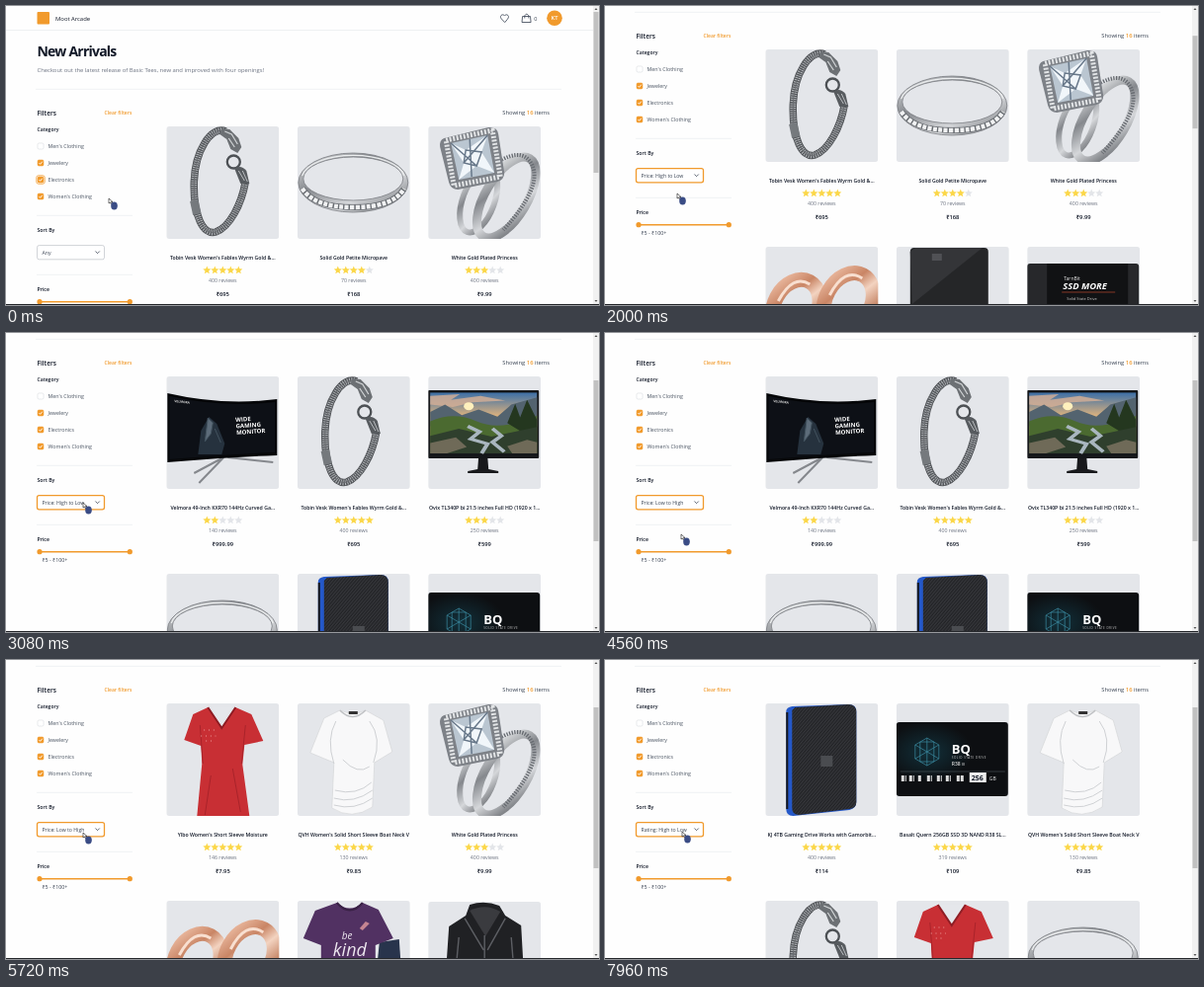
An HTML page that plays this animation: 600x303 px, repeating every 8000 ms.

```html
<!DOCTYPE html>
<html lang="en">
<head>
<meta charset="utf-8">
<title>New Arrivals</title>
<style>
  html, body { margin: 0; width: 100%; height: 100%; overflow: hidden; background: #fefefe; }
  svg { display: block; width: 100vw; height: 100vh; }
  text { font-family: "Open Sans", "Noto Sans", sans-serif; fill: #111827; white-space: pre; }
  .line { stroke: #e5e7eb; stroke-width: .6; }
  .icon { fill: none; stroke: #374151; stroke-width: .8; stroke-linejoin: round; stroke-linecap: round; }
  .none { fill: none; }
</style>
</head>
<body>
<svg id="stage" viewBox="0 0 600 303" preserveAspectRatio="none">
  <defs>
    <clipPath id="tile"><rect width="114" height="114" rx="3"/></clipPath>
    <linearGradient id="silver" x2="1" y2="1">
      <stop stop-color="#eceeef"/><stop offset=".35" stop-color="#85888d"/>
      <stop offset=".65" stop-color="#d5d7da"/><stop offset="1" stop-color="#606368"/>
    </linearGradient>
    <linearGradient id="rose" x2="1" y2=".6">
      <stop stop-color="#e9b79d"/><stop offset=".35" stop-color="#c98565"/>
      <stop offset=".6" stop-color="#f3d3c0"/><stop offset="1" stop-color="#bd7857"/>
    </linearGradient>
    <linearGradient id="sky" x2="0" y2="1">
      <stop stop-color="#3c6fa6"/><stop offset=".4" stop-color="#e2b47c"/><stop offset="1" stop-color="#5d6b45"/>
    </linearGradient>
    <radialGradient id="teal" cx=".28" cy=".4" r=".4">
      <stop stop-color="#12303a"/><stop offset="1" stop-color="#0d0f12"/>
    </radialGradient>
    <pattern id="mesh" width="2.4" height="2.4" patternUnits="userSpaceOnUse" patternTransform="rotate(40)">
      <rect width="2.4" height="2.4" fill="#222326"/><rect width="1.1" height="2.4" fill="#37383c"/>
    </pattern>

    <path id="chain" d="M60 5C45-1 29 25 28 56C27 90 37 111 50 107C64 102 76 79 80 56" fill="none"/>
    <g id="bracelet">
      <use href="#chain" stroke="#505357" stroke-width="7.500"/>
      <use href="#chain" stroke="#b1b4b8" stroke-width="5.800" stroke-dasharray="1 1.2"/>
      <use href="#chain" stroke="#6a6d71" stroke-width="1"/>
      <path d="M28 75l3 14" stroke="#75797d" stroke-width="8.500"/>
      <path d="M56 2l8 1 9 9 3 9-4 6-7-4-4-10-7-5z" fill="#6c7074"/>
      <path d="M59 5l7 3 6 10M63 12l6 9" stroke="#d0d3d5" class="none" stroke-width="1.200"/>
      <circle cx="68" cy="36" r="6.500" class="none" stroke="#4d5155" stroke-width="2.300"/>
      <path d="M69 43q6-5 12 2l3 13h-9z" fill="#575b5f"/>
      <path d="M73 45l6 10M77 45l5 11" stroke="#babdc0"/>
    </g>
    <g id="ring">
      <path d="M1 57A55.500 30 0 0 1 112 57A55.500 30 0 0 1 1 57zM6 53A50.500 22 0 0 0 107 53A50.500 22 0 0 0 6 53z"
            fill="url(#silver)" fill-rule="evenodd" stroke="#7a7d82" stroke-width=".8"/>
      <path d="M5 50A52 24 0 0 1 108 50" class="none" stroke="#eceeef" stroke-width="1.200"/>
      <path d="M5 63Q17 82 57 82T108 63" class="none" stroke="#696d72" stroke-width="6"/>
      <path d="M5 63Q17 82 57 82T108 63" class="none" stroke="#f1f2f3" stroke-width="4.400" stroke-dasharray="4 1.4"/>
    </g>
    <g id="princess">
      <g class="none" stroke="url(#silver)">
        <ellipse cx="51" cy="75" rx="16" ry="34" transform="rotate(20 51 75)" stroke-width="6"/>
        <ellipse cx="79" cy="72" rx="21" ry="46" transform="rotate(31 79 72)" stroke-width="9"/>
      </g>
      <path d="M61 43Q94 17 105 39T76 105" class="none" stroke="#666a70" stroke-width="4" stroke-dasharray="1.3 1.4"/>
      <path d="M16 12L61 1Q70 0 71 8L77 47Q77 54 70 56L30 64Q23 64 21 57L12 21Q11 14 16 12z" fill="#7d8187"/>
      <path d="M18 14L65 4L73 51L26 60z" class="none" stroke="#e2e4e6" stroke-width="5" stroke-dasharray="2 1.6"/>
      <path d="M23 17L60 9L67 47L31 54z" fill="#bac6d1"/>
      <path d="M23 17L38 24L60 9L54 26L67 47L49 40L31 54L36 37z" fill="#f1f6fa"/>
      <path d="M38 24L54 26L49 40L36 37zM23 17L49 40M60 9L36 37M42 13L44 51" class="none" stroke="#68788a" stroke-width="1.500"/>
    </g>
    <g id="earrings" class="none" stroke="url(#rose)">
      <ellipse cx="31" cy="61" rx="22" ry="29" transform="rotate(28 31 61)" stroke-width="15"/>
      <ellipse cx="84" cy="56" rx="23" ry="31" transform="rotate(28 84 56)" stroke-width="15"/>
      <path d="M13 55Q28 27 45 38M65 49Q80 20 98 32" stroke="#f8dfd0" stroke-width="3"/>
    </g>
    <g id="blackDrive">
      <rect x="14" y="1" width="79" height="116" rx="4" fill="#252628"/>
      <path d="M14 5l5-4h68l-71 57z" fill="#343538"/>
      <rect x="36" y="7" width="10" height="7" fill="#505155"/>
    </g>
    <g id="ssdPlain">
      <rect y="17" width="113" height="82" rx="3" fill="#27282b"/>
      <rect x="20" y="17" width="82" height="82" fill="#111214"/>
      <text x="37" y="34" font-size="5" style="fill:#eee">TarnBit</text>
      <text x="36" y="43" font-size="9.400" font-weight="700" font-style="italic" style="fill:#fff">SSD MORE</text>
      <path d="M35 46h54" stroke="#b8472d" stroke-width=".7"/>
      <text x="40" y="54" font-size="4" style="fill:#ccc">Solid State Drive</text>
    </g>
    <g id="wideMonitor">
      <path d="M58 82L33 108M62 82L108 87M58 82L28 98" class="none" stroke="#85888d" stroke-width="2"/>
      <path d="M1 17Q57 30 112 23V80Q57 82 1 87z" fill="#050608"/>
      <path d="M3 20Q57 32 110 26V77Q57 79 3 84z" fill="#0d1016"/>
      <path d="M32 79l3-24 8-14 8 7 8 20-3 11z" fill="#26323e"/>
      <path d="M42 42l5 5-2 11-6 8zM49 53l6 14" fill="#5d6c7a" stroke="#43535f"/>
      <text x="8" y="26" font-size="3.200" font-weight="700" transform="rotate(6 8 26)" style="fill:#ddd">VELMORA</text>
      <g font-size="6" font-weight="700" transform="rotate(-4 71 47)">
        <text x="70" y="46" style="fill:#fff">WIDE</text>
        <text x="70" y="52.500" style="fill:#fff">GAMING</text>
        <text x="70" y="59" style="fill:#fff">MONITOR</text>
      </g>
    </g>
    <g id="flatMonitor">
      <path d="M51 81h9l1 13 10 2v2H40v-2l10-2z" fill="#18191c"/>
      <rect x="0" y="14" width="112" height="69" rx="1" fill="#15171a"/>
      <g transform="translate(0 3.500) scale(1 .81)">
        <rect x="2" y="16" width="108" height="76" fill="url(#sky)"/>
        <path d="M2 20l30-2-9 7 30-5 25 6-33 2-20 6-23-3z" fill="#d8b197" opacity=".8"/>
        <path d="M2 40l15-9 17 13 17-7 19 9 14-15 26-9v36H2z" fill="#53636f"/>
        <path d="M2 52q24-13 47 0t61-7v47H2z" fill="#4b6a30"/>
        <path d="M80 54l8-24 5 17 7-22 10 25v27z" fill="#24371f"/>
        <path d="M2 70l29-9 33 10 46-12v33H2z" fill="#2f3f2d"/>
        <path d="M40 58l12 7-9 9 17 6-6 12M65 61l9 9-9 8 12 12" class="none" stroke="#a9b6bf" stroke-width="4"/>
        <path d="M2 79l26-7 11 12-20 8H2zM80 83l20-8 10 3v14H85z" fill="#6f6a58"/>
        <circle cx="41" cy="33" r="5" fill="#fff0bd"/>
      </g>
    </g>
    <g id="gameDrive">
      <path d="M21 8q0-4 6-5l57-2q8 0 8 7v92q0 6-7 8l-57 6q-7 0-7-7z" fill="#2458c9"/>
      <path d="M27 7l3-3 54-3q8 0 8 8v91q0 6-7 7l-51 6q-7 0-7-7z" fill="url(#mesh)"/>
      <path d="M22 9v98" stroke="#16171b" stroke-width="2"/>
      <rect x="56" y="53" width="12" height="11" fill="#4a4c50"/>
    </g>
    <g id="ssdTeal">
      <rect y="19" width="113" height="75" rx="3" fill="url(#teal)"/>
      <path d="M31 35l12 7v14l-12 7-12-7V42zM31 35v28M19 42l24 14M43 42L19 56M24 39v20h14V39z" class="none" stroke="#3b8ca2" stroke-width=".7"/>
      <text x="56" y="51" font-size="13" font-weight="700" style="fill:#fff">BQ</text>
      <text x="56" y="56" font-size="3" letter-spacing=".5" style="fill:#ccc">SOLID STATE DRIVE</text>
      <text x="56" y="63" font-size="5" font-weight="600" style="fill:#ddd">R38 <tspan font-size="3">III</tspan></text>
      <path d="M4 69h106" stroke="#5b656b" stroke-width=".5"/>
      <path d="M5 76h5M13 76h5M22 76h4M31 76h5M41 76h5M50 76h5M61 76h8" stroke="#ddd" stroke-width="6" stroke-dasharray="3 1"/>
      <rect x="74" y="70" width="17" height="10" fill="#eee"/>
      <text x="76" y="78" font-size="7" font-weight="700">256</text>
      <text x="94" y="78" font-size="5" style="fill:#eee">GB</text>
    </g>
    <g id="redTee">
      <path d="M42 4L27 11 18 37 35 43 36 61 31 114H84L77 62 79 42 98 38 86 11 70 4Q56 11 42 4z" fill="#c82f34"/>
      <path d="M42 4L56 25 70 4" fill="#e5e7eb" stroke="#8f1d24" stroke-width="2"/>
      <path d="M34 22l3 39M80 22l-4 39M45 73l-6 40M67 66l8 44" class="none" stroke="#a9232a"/>
      <path d="M38 27h14M35 33h15M40 38h8" stroke="#f4b6b4" stroke-dasharray=".8 4"/>
    </g>
    <g id="whiteTee">
      <path d="M43 7Q57 13 69 7L87 17 96 49 78 60 76 105Q55 119 35 106L37 60 13 50 27 15z" fill="#f8f8f9" stroke="#d1d2d4" stroke-width=".6"/>
      <path d="M43 7Q56 20 69 7" class="none" stroke="#bfc1c4" stroke-width="1.500"/>
      <rect x="52" y="8" width="9" height="3" fill="#333"/>
      <path d="M37 61Q29 36 39 18M77 60Q86 35 73 18M38 88Q60 94 75 80M37 96Q57 102 76 88M37 103Q58 109 76 96M46 57Q61 73 73 64" class="none" stroke="#cfd1d4"/>
    </g>
    <g id="purpleTee">
      <path d="M83 42l20-3 5 75H76z" fill="#28344c"/>
      <path d="M40 2L18 10 6 38 24 45V114H79V45L97 38 82 9 66 2Q53 13 40 2z" fill="#513162"/>
      <path d="M40 2Q53 17 66 2" class="none" stroke="#382044" stroke-width="2"/>
      <text x="45" y="39" font-size="10" font-style="italic" style="fill:#ede7ef">be</text>
      <text x="36" y="56" font-size="18" font-style="italic" style="fill:#ede7ef">kind</text>
      <path d="M63 28l6-7 4 2-7 7" fill="#c48491"/>
    </g>
    <g id="jacket">
      <path d="M42 3Q57-2 72 4L78 14 94 24 99 114H15L21 25 38 14z" fill="#202124"/>
      <path d="M42 9Q58 1 73 10L58 35z" fill="#3a3b3f"/>
      <path d="M57 34v80M37 17l19 32M78 17L60 49M31 36l-7 75M84 36l6 75" class="none" stroke="#5d5f64" stroke-width="1.400"/>
    </g>
  </defs>

  <rect width="600" height="303" fill="#fefefe"/>
  <g id="page"></g>
  <g id="bar">
    <rect x="594" width="6" height="303" fill="#f1f1f1"/>
    <path d="M595.500 4l1.500-2 1.500 2zM595.500 298l1.500 2 1.500-2z" fill="#555"/>
    <rect id="thumb" x="594.500" width="5" fill="#c1c1c1"/>
  </g>
  <rect y="302" width="600" height="1" fill="#25272b"/>
  <g id="cursor">
    <path id="arrow" d="M0 0v5l1.400-1 .9 1.700 1-.5-.9-1.700H4z" fill="#fff" stroke="#111" stroke-width=".6"/>
    <ellipse id="pet" cx="5.500" cy="7.500" rx="3.300" ry="4" fill="#3a4c85"/>
  </g>
</svg>
<script>
const LOOP = 8000, SCROLL = 78, ORANGE = '#f19a2c', GREY = '#6b7280';
const $ = id => document.getElementById(id);

const text = (x, y, s, size, { fill = '#111827', weight = 400, anchor = 'start', extra = '' } = {}) =>
  `<text x="${x}" y="${y}" font-size="${size}" font-weight="${weight}" text-anchor="${anchor}" style="fill:${fill}" ${extra}>${s}</text>`;
const rule = (x1, x2, y) => `<path class="line" d="M${x1} ${y}H${x2}"/>`;

const products = {
  bracelet: ["Tobin Vesk Women's Fables Wyrm Gold &amp;...", 5, 400, '695'],
  ring: ['Solid Gold Petite Micropave', 4, 70, '168'],
  princess: ['White Gold Plated Princess', 3, 400, '9.99'],
  wideMonitor: ['Velmora 49-Inch KXR70 144Hz Curved Ga...', 2, 140, '999.99'],
  flatMonitor: ['Ovix TL340P bi 21.5 inches Full HD (1920 x 1...', 3, 250, '599'],
  redTee: ["Ylbo Women's Short Sleeve Moisture", 5, 146, '7.95'],
  whiteTee: ["QVH Women's Solid Short Sleeve Boat Neck V", 5, 130, '9.85'],
  gameDrive: ['KJ 4TB Gaming Drive Works with Gamorbit...', 5, 400, '114'],
  ssdTeal: ['Basalt Quern 256GB SSD 3D NAND R38 SL...', 5, 319, '109']
};
const options = ['Any', 'Price: High to Low', 'Price: Low to High', 'Rating: High to Low', 'Rating: Low to High'];

// pick: option chosen, clear: old cards vanish, enter: new cards start sliding
const sorts = [
  { pick: 0, clear: 0, enter: -LOOP, items: 'bracelet ring princess earrings blackDrive ssdPlain' },
  { pick: 1960, clear: 2340, enter: 2400, items: 'wideMonitor bracelet flatMonitor ring gameDrive ssdTeal' },
  { pick: 4480, clear: 5030, enter: 5130, items: 'redTee whiteTee princess earrings purpleTee jacket' },
  { pick: 6960, clear: 7240, enter: 7300, items: 'gameDrive ssdTeal whiteTee bracelet redTee ring' }
];
const opened = [1350, 3500, 5950];
const cursorPath = [
  [0, 104, 195], [500, 104, 195], [1200, 78, 174], [1450, 78, 174], [1880, 73, 190], [2040, 73, 190],
  [2650, 78, 172], [3600, 78, 172], [4250, 77, 204], [4600, 77, 204], [5150, 78, 175],
  [6050, 78, 175], [6600, 73, 216], [7000, 73, 216], [7500, 78, 174], [LOOP, 78, 174]
];

const starPoints = Array.from({ length: 10 }, (_, i) => {
  const r = i % 2 ? 1.9 : 4.2, a = i * Math.PI / 5;
  return `${(r * Math.sin(a)).toFixed(2)},${(-r * Math.cos(a)).toFixed(2)}`;
}).join(' ');

function card(name, i) {
  let out = `<g clip-path="url(#tile)"><rect width="114" height="114" fill="#e4e6ea"/><use href="#${name}"/></g>`;
  if (i < 3) {
    const [title, rating, reviews, price] = products[name];
    const mid = { anchor: 'middle' };
    out += text(57, 135.2, title, 5.2, { ...mid, weight: 600 });
    for (let k = 0; k < 5; k++)
      out += `<polygon points="${starPoints}" transform="translate(${41 + k * 8} 145.800)" fill="${k < rating ? '#fbd749' : '#e3e5e9'}"/>`;
    out += text(57, 157.600, reviews + ' reviews', 5.25, { ...mid, fill: GREY });
    out += text(57, 172, '₹' + price, 5.8, { ...mid, weight: 600 });
  }
  return `<g class="card">${out}</g>`;
}

function checkbox(label, i) {
  const y = 142 + i * 17, on = i > 0;
  const focus = i === 2 ? `<rect id="boxFocus" x="30.800" y="${y - 4.2}" width="8.400" height="8.400" rx="2" fill="none" stroke="${ORANGE}" stroke-width=".8"/>` : '';
  return focus + `<rect x="32" y="${y - 3}" width="6" height="6" rx="1.300" fill="${on ? ORANGE : '#fff'}" stroke="${on ? ORANGE : '#d1d5db'}" stroke-width=".5"/>` +
    (on ? `<path d="M33.400 ${y}l1.200 1.300 2.200-2.600" fill="none" stroke="#fff" stroke-width=".9"/>` : '') +
    text(42.5, y + 2, label, 5.3, { fill: '#4b5563' });
}

const bold = { weight: 600 };
$('page').innerHTML = [
  `<rect x="31.500" y="6" width="12.500" height="12.500" rx="1" fill="${ORANGE}"/>`,
  text(50, 14.5, 'Moot Arcade', 5.9),
  '<path class="icon" d="M504.500 16.300l-3.300-3.400c-2.400-2.700 1.300-5.800 3.300-3 2-2.800 5.700.3 3.300 3z"/>',
  '<path class="icon" d="M523 10.500h7.500l.6 6h-8.700zM524.800 12V9.800q2-3.300 4 0V12"/>',
  text(534.3, 14.7, '0', 5.5, { fill: '#374151' }),
  `<circle cx="555" cy="12.200" r="7.800" fill="${ORANGE}"/>`,
  text(555, 14.4, 'KT', 5.8, { fill: '#fff', weight: 600, anchor: 'middle' }),
  rule(0, 594, 24.5),
  text(31.5, 51.3, 'New Arrivals', 14, { weight: 700, extra: 'letter-spacing="-.055em"' }),
  text(31.5, 66.5, 'Checkout out the latest release of Basic Tees, new and improved with four openings!', 5.88, { fill: GREY }),
  rule(30, 562, 84.3),
  text(31.5, 111.4, 'Filters', 6.5, bold),
  text(99.5, 109.6, 'Clear filters', 5, { fill: ORANGE, weight: 600 }),
  text(502.3, 110.3, `Showing <tspan style="fill:${ORANGE}" font-weight="600">16</tspan> items`, 5.85, { fill: '#374151' }),
  text(31.5, 127, 'Category', 5.1, bold),
  ["Men's Clothing", 'Jewelery', 'Electronics', "Women's Clothing"].map(checkbox).join(''),
  rule(31, 128, 212.3),
  text(31.5, 228.9, 'Sort By', 5.2, bold),
  '<rect id="select" x="31.500" y="242.600" width="68" height="14.200" rx="2" fill="#fff"/>',
  text(36.5, 251.8, '', 5.15, { fill: '#374151', extra: 'id="value"' }),
  '<path class="icon" d="M90.700 248.800l1.900 1.900 1.900-1.900"/>',
  rule(31, 128, 272.3),
  text(31.5, 288.9, 'Price', 5.2, bold),
  `<path d="M34 299.700H125" stroke="${ORANGE}" stroke-width="1.500"/>`,
  `<circle cx="34" cy="299.700" r="2.600" fill="${ORANGE}"/><circle cx="125.300" cy="299.700" r="2.600" fill="${ORANGE}"/>`,
  text(36.5, 310, '₹5 - ₹100+', 5.35, { fill: '#374151' }),
  sorts.map(s => `<g class="set">${s.items.split(' ').map(card).join('')}</g>`).join(''),
  '<g id="popup"><rect x="31.800" y="257.200" width="67.500" height="53" fill="#fff" stroke="#b9bcc2" stroke-width=".6"/>',
  '<rect id="hover" x="32" width="67" height="10.500" fill="#1c62d1"/>',
  options.map((o, i) => text(36.5, 264.5 + i * 10.5, o, 5.15, { extra: 'class="option"' })).join(''),
  '</g>'
].join('');

const sets = [...document.querySelectorAll('.set')];
const optionLabels = [...document.querySelectorAll('.option')];
const show = (el, on) => { el.style.display = on ? '' : 'none'; };
const clamp = v => Math.max(0, Math.min(1, v));
const remaining = p => (1 - clamp(p)) ** 3;

function cursorAt(t) {
  const i = cursorPath.findIndex(k => k[0] > t);
  const [t0, x0, y0] = cursorPath[i - 1], [t1, x1, y1] = cursorPath[i];
  const p = (t - t0) / (t1 - t0), e = p * p * (3 - 2 * p);
  return [x0 + (x1 - x0) * e, y0 + (y1 - y0) * e];
}

function render(t) {
  const scroll = SCROLL * (1 - remaining((t - 120) / 560));
  const [x, y] = cursorAt(t);
  const chosen = sorts.findLastIndex(s => t >= s.pick);
  const visible = sorts.findLastIndex(s => t >= s.clear);
  const open = opened.some((from, i) => t >= from && t < sorts[i + 1].pick);

  $('page').setAttribute('transform', `translate(0 ${-scroll})`);

  const height = t > 160 && visible === 0 ? 935 : 539;
  $('thumb').setAttribute('y', 6 + scroll / height * 290);
  $('thumb').setAttribute('height', 303 / height * 290);

  $('value').textContent = options[chosen];
  const focused = t >= opened[0];
  $('select').setAttribute('stroke', focused ? ORANGE : '#a3a8b1');
  $('select').setAttribute('stroke-width', focused ? 1.3 : .5);
  show($('boxFocus'), !focused && t < 1300);

  const over = open && y > 179;
  const active = over ? Math.min(4, Math.floor((y - 179) / 10.5)) : chosen;
  show($('popup'), open);
  $('hover').setAttribute('y', 257.4 + active * 10.5);
  optionLabels.forEach((o, i) => { o.style.fill = i === active ? '#fff' : '#222'; });

  sets.forEach((set, i) => {
    show(set, i === visible && t >= sorts[i].enter);
    [...set.children].forEach((el, k) => {
      const drop = 300 * remaining((t - sorts[i].enter - k * 50) / 400);
      const left = [162.3, 294.8, 427.2][k % 3], top = k < 3 ? 122 : 322;
      el.setAttribute('transform', `translate(${left} ${top + drop})`);
    });
  });

  $('cursor').setAttribute('transform', `translate(${x} ${y})`);
  $('arrow').setAttribute('transform', over ? 'scale(1.6)' : '');
  show($('pet'), !over);
}

const start = performance.now();
function tick() {
  render((performance.now() - start) % LOOP);
  requestAnimationFrame(tick);
}
tick();
</script>
</body>
</html>
```
